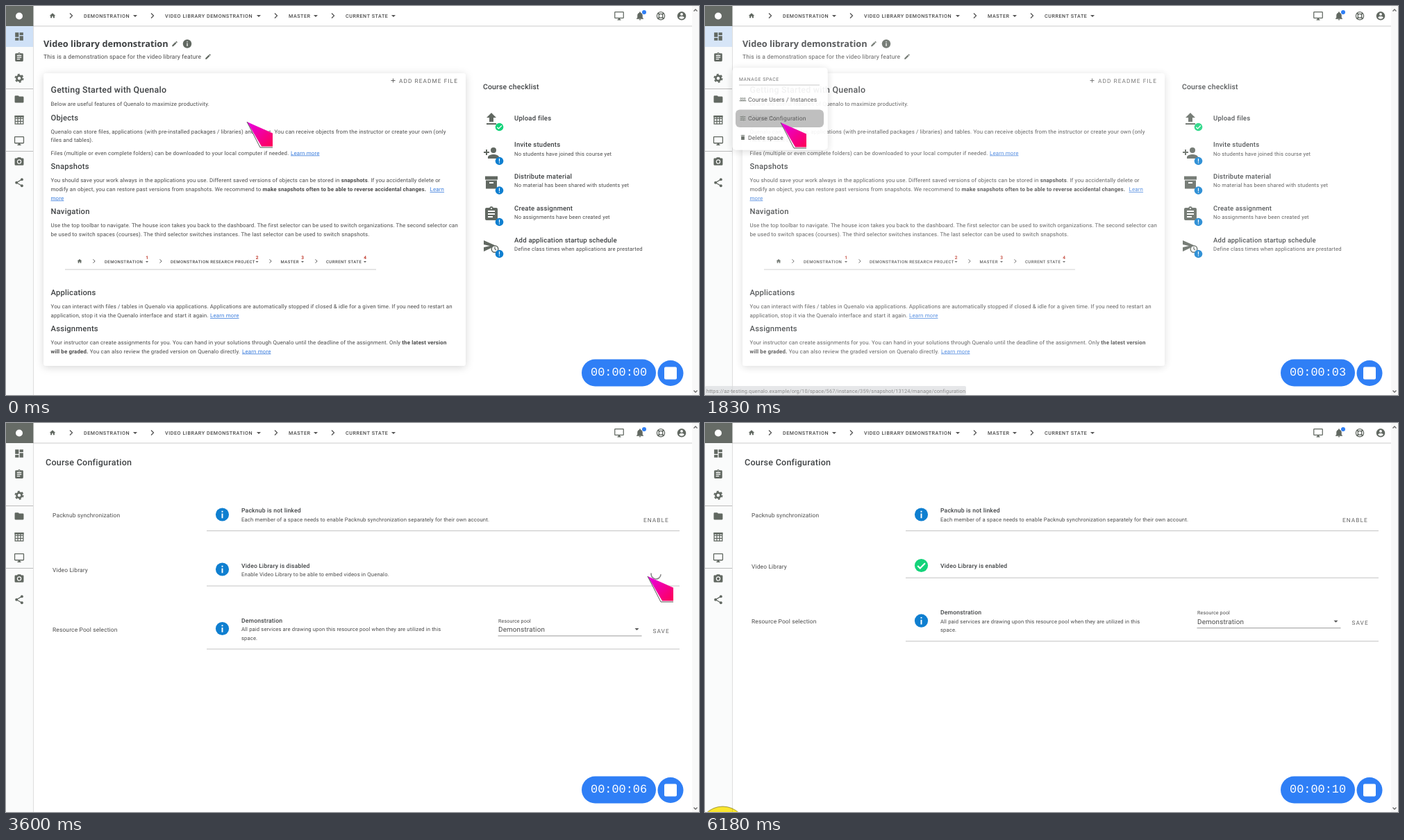
These frames come from a looping animation (998x561 px, 6240 ms). An HTML page:

```html
<!DOCTYPE html>
<html lang="en">
<head>
<meta charset="utf-8">
<title>Course configuration walkthrough</title>
<style>
html, body { margin: 0; width: 100%; height: 100%; overflow: hidden; background: #fff; }
svg { display: block; width: 998px; height: 561px; }
text { font-family: Roboto, sans-serif; letter-spacing: .02em; fill: #4a4a4a; text-rendering: geometricPrecision; }
.m { font-weight: 500; fill: #3e4143; }
.b { font-weight: 700; }
.t { font-family: "Open Sans", sans-serif; font-weight: 700; letter-spacing: 0; fill: #3e4143; }
.nav { font-weight: 500; letter-spacing: .075em; }
.btn { letter-spacing: .127em; fill: #666; }
.cap { letter-spacing: .09em; fill: #666; }
.num { font-weight: 700; fill: #c0392b; }
.a { fill: #3b7ddd; text-decoration: underline; }
.timer { font-family: "Liberation Mono", monospace; letter-spacing: 0; fill: #fff; }
</style>
</head>
<body>
<svg id="stage" viewBox="0 0 998 561"></svg>
<script>
const GREY = '#616861', BLUE = '#0f7fd0', BRIGHT = '#2f7ff6';

// Icons are drawn on a 24-unit grid.
const p = (d, fill = '') => `<path d="${d}"${fill && ` fill="${fill}"`}/>`;
const line = (d, color, width) => `<path d="${d}" fill="none" stroke="${color}" stroke-width="${width}"/>`;
const ring = (r, color, width, extra = '', cx = 12, cy = 12) =>
  `<circle cx="${cx}" cy="${cy}" r="${r}" fill="none" stroke="${color}" stroke-width="${width}" ${extra}/>`;
const dot = (x, y, r, fill) => `<circle cx="${x}" cy="${y}" r="${r}" fill="${fill}"/>`;
const icons = {
  dashboard: p('M3 13h8V3H3zm0 8h8v-6H3zm10 0h8V11h-8zm0-18v6h8V3z'),
  assignment: p('M5 3h4.2a3 3 0 0 1 5.6 0H19a2 2 0 0 1 2 2v14a2 2 0 0 1-2 2H5a2 2 0 0 1-2-2V5a2 2 0 0 1 2-2z') +
    dot(12, 4, 1, '#fff') + p('M7 7h10v2H7zm0 4h10v2H7zm0 4h7v2H7z', '#fff'),
  gear: ring(5.5, GREY, 4) + ring(8.6, GREY, 3, 'stroke-dasharray="4.5 4.5"'),
  folder: p('M10 4H4a2 2 0 0 0-2 2v12a2 2 0 0 0 2 2h16a2 2 0 0 0 2-2V8a2 2 0 0 0-2-2h-8z'),
  table: line('M3 3h18v18H3zM3 9h18M3 15h18M9 4v17M15 4v17', GREY, 2) + p('M2 2h20v4H2z'),
  desktop: line('M3 3h18a1 1 0 0 1 1 1v12a1 1 0 0 1-1 1H3a1 1 0 0 1-1-1V4a1 1 0 0 1 1-1z', GREY, 2) + p('M10 17h4v3h2v2H8v-2h2z'),
  camera: p('M9 2 7.2 4H4a2 2 0 0 0-2 2v12a2 2 0 0 0 2 2h16a2 2 0 0 0 2-2V6a2 2 0 0 0-2-2h-3.2L15 2z') + ring(4.1, '#fff', 1.8),
  share: line('M18 5 6 12l12 7', GREY, 2) + dot(18, 5, 3, GREY) + dot(6, 12, 3, GREY) + dot(18, 19, 3, GREY),
  home: p('M10 20v-6h4v6h5v-8h3L12 3 2 12h3v8z'),
  bell: p('M10 20h4a2 2 0 0 1-4 0zM18 16v-5c0-3-1.6-5.6-4.5-6.3V4a1.5 1.5 0 0 0-3 0v.7C7.6 5.4 6 8 6 11v5l-2 2v1h16v-1z'),
  buoy: ring(9, GREY, 2) + ring(4.5, GREY, 2) + line('M5 5l4 4M19 5l-4 4M5 19l4-4M19 19l-4-4', GREY, 3),
  account: dot(12, 12, 10, GREY) + dot(12, 8.2, 3, '#fff') + p('M6 16c0-4 12-4 12 0-3 4.2-9 4.2-12 0z', '#fff'),
  edit: p('M3 17.2V21h3.8L17.8 9.9l-3.7-3.7zM20.7 7a1 1 0 0 0 0-1.4l-2.3-2.3a1 1 0 0 0-1.4 0l-1.9 1.8 3.8 3.8z'),
  info: dot(12, 12, 10, 'inherit') + p('M11 10.5h2v7h-2zM11 6.5h2v2h-2z', '#fff'),
  check: dot(12, 12, 10, '#14d37a') + line('M6.5 12.5l3.7 3.7 7.500-7.500', '#fff', 2.2),
  alert: dot(12, 12, 10, BLUE) + p('M11 6h2v7.5h-2zM11 15.5h2v2h-2z', '#fff'),
  upload: p('M5 20h14v-2H5zm0-10h4v6h6v-6h4l-7-7z'),
  invite: dot(15, 8, 4, GREY) + p('M6 10V7H4v3H1v2h3v3h2v-3h3v-2zm9 4c-2.7 0-8 1.3-8 4v2h16v-2c0-2.7-5.3-4-8-4z'),
  archive: p('M3 3h18v5H3zM4 9h16v12H4z') + p('M9 11.5h6v2H9z', '#fff'),
  send: p('M1 4l17 7.5-3 1-4.500 3L1 20v-6l9-2-9-2z') + dot(17, 16.5, 5.5, GREY) + dot(17, 16.5, 4, '#fff') +
    line('M17 13.5v3l2 1.5', GREY, 1.3),
  group: [5, 12, 19].map(x => ring(2.2, GREY, 1.8, '', x, 9)).join('') +
    line('M1 18c0-5 8-5 8 0M8 18c0-5 8-5 8 0M15 18c0-5 8-5 8 0M0 18h24', GREY, 1.8),
  tune: line('M2 6h9M15 6h7M13 3v6M2 12h4M10 12h12M8 9v6M2 18h11M17 18h5M15 15v6', GREY, 2.2),
  bin: p('M6 8h12v13H6zM5 4h4l1-1h4l1 1h4v2H5z'),
};

const icon = (name, x, y, size, color = GREY) =>
  `<g transform="translate(${x - size / 2} ${y - size / 2}) scale(${size / 24})" fill="${color}">${icons[name]}</g>`;
const text = (x, y, size, str, cls = '') => `<text x="${x}" y="${y}" font-size="${size}" class="${cls}">${str}</text>`;
const rect = (x, y, w, h, fill, rx = 0, extra = '') =>
  `<rect x="${x}" y="${y}" width="${w}" height="${h}" rx="${rx}" fill="${fill}" ${extra}/>`;
const rule = (x, y, w, color = '#c4c4c4') => rect(x, y, w, 1, color);
const chevron = (x, y, s = 1) => line(`M${x - 2 * s} ${y - 3.5 * s}l${3.5 * s} ${3.5 * s}l${-3.5 * s} ${3.5 * s}`, '#555', 1.3 * s);
const drop = (x, y, s = 3) => `<path d="M${x - s} ${y - s / 2}h${2 * s}l${-s} ${s}z" fill="#555"/>`;
const more = (x, label = 'Learn more') => `<tspan class="a" x="${x}">${label}</tspan>`;
const bold = s => `<tspan class="b">${s}</tspan>`;
const group = (id, body) => `<g id="${id}">${body}</g>`;

const crumbs = [[112, 'DEMONSTRATION', 186, 94], [229, 'VIDEO LIBRARY DEMONSTRATION', 364, 211],
  [407, 'MASTER', 446, 389], [489, 'CURRENT STATE', 558, 471]];
const strip = [[142, 'DEMONSTRATION', 203, 127], [237, 'DEMONSTRATION RESEARCH PROJECT', 361.5, 223],
  [395.5, 'MASTER', 427, 381], [461, 'CURRENT STATE', 517, 447]];

const shell =
  rect(0, 29, 39, 532, '#fafbfb') + rect(39, 29, 1, 532, '#dedede') +
  rect(988, 0, 10, 561, '#f8f8f8') + line('M990.5 7.5l2.5-2.5 2.5 2.5M990.5 554.5l2.5 2.5 2.5-2.5', '#666', 1.3) +
  rule(39, 28.5, 949, '#ccc') + rect(0, 0, 39.5, 29, '#666b66') + dot(19, 14.5, 5, '#fff') +
  group('active', rect(0, 29, 39, 30, '#cfe1f7')) +
  ['dashboard', 'assignment', 'gear', 'folder', 'table', 'desktop', 'camera', 'share']
    .map((n, i) => icon(n, 19, 44 + 30.1 * i, 15.5)).join('') +
  rule(0, 119, 39, '#bbb') + rule(0, 209, 39, '#bbb') +
  icon('home', 67, 14, 10) +
  crumbs.map(([x, s, d, c]) => text(x, 17, 7.2, s, 'nav') + drop(d, 14.5) + chevron(c, 14)).join('') +
  ['desktop', 'bell', 'buoy', 'account'].map((n, i) => icon(n, 883 + 30 * i, 14.3, 15)).join('') + dot(919, 9, 3, BRIGHT);

const prose = [
  [124.5, 12.4, 'Getting Started with Quenalo', 'm'],
  [144, 7.9, 'Below are useful features of Quenalo to maximize productivity.'],
  [165, 11.2, 'Objects', 'm'],
  [183.5, 7.9, 'Quenalo can store files, applications (with pre-installed packages / libraries) and tables. You can receive objects from the instructor or create your own (only'],
  [196, 7.9, 'files and tables).'],
  [214.5, 7.9, 'Files (multiple or even complete folders) can be downloaded to your local computer if needed.' + more(410)],
  [235, 11.2, 'Snapshots', 'm'],
  [254, 7.9, `You should save your work always in the applications you use. Different saved versions of objects can be stored in ${bold('snapshots')}. If you accidentally delete or`],
  [267, 7.9, `modify an object, you can restore past versions from snapshots. We recommend to ${bold('make snapshots often to be able to reverse accidental changes.')}` + more(610.5, 'Learn')],
  [279.5, 7.9, more(64.5, 'more')],
  [300, 11.2, 'Navigation', 'm'],
  [318.5, 7.9, 'Use the top toolbar to navigate. The house icon takes you back to the dashboard. The first selector can be used to switch organizations. The second selector can'],
  [331.5, 7.9, 'be used to switch spaces (courses). The third selector switches instances. The last selector can be used to switch snapshots.'],
  [417, 11.2, 'Applications', 'm'],
  [436, 7.9, 'You can interact with files / tables in Quenalo via applications. Applications are automatically stopped if closed &amp; idle for a given time. If you need to restart an'],
  [449, 7.9, 'application, stop it via the Quenalo interface and start it again.' + more(294)],
  [469, 11.2, 'Assignments', 'm'],
  [488, 7.9, `Your instructor can create assignments for you. You can hand in your solutions through Quenalo until the deadline of the assignment. Only ${bold('the latest version')}`],
  [500.5, 7.9, `${bold('will be graded.')} You can also review the graded version on Quenalo directly.` + more(340)],
];
const tasks = [
  ['upload', 163, 165, 'Upload files', ''],
  ['invite', 212, 203, 'Invite students', 'No students have joined this course yet'],
  ['archive', 254.5, 248.5, 'Distribute material', 'No material has been shared with students yet'],
  ['assignment', 300, 294.5, 'Create assignment', 'No assignments have been created yet'],
  ['send', 346, 340.5, 'Add application startup schedule', 'Define class times when applications are prestarted'],
];

const home = text(54, 59, 12.75, 'Video library demonstration', 't') + icon('edit', 243, 54.5, 10) + icon('info', 261, 54.5, 15) +
  text(54, 76, 8.5, 'This is a demonstration space for the video library feature') + icon('edit', 291, 73, 10) +
  rect(54, 97, 608, 422, '#fff', 4, 'filter="url(#soft)"') +
  line('M554.5 107.5h6M557.5 104.5v6', '#666', 1) + text(566, 111, 8.3, 'ADD README FILE', 'btn') +
  prose.map(([y, size, s, cls]) => text(64.5, y, size, s, cls)).join('') +
  icon('home', 106, 368, 8) + rule(85, 379.5, 448, '#ccc') +
  strip.map(([x, s, d, c], i) => text(x, 370.5, 6, s, 'nav') + drop(d, 369, 2) + chevron(c, 368, .75) +
    text(d - 1.7, 365, 6.5, i + 1, 'num')).join('') +
  text(687, 120, 10.4, 'Course checklist', 'm') +
  tasks.map(([n, iy, y, title, note], i) => icon(n, 699, iy, 24) + icon(i ? 'alert' : 'check', 710.5, iy + 11.5, 14) +
    text(732, y, 9.6, title, 'm') + text(732, y + 12.5, 7.7, note)).join('');

const menu = rect(39.5, 89, 137, 118.5, '#fff', 5, 'filter="url(#soft)"') +
  text(49, 107.5, 6.8, 'MANAGE SPACE', 'cap') + rule(49, 113.5, 116) +
  rect(44, 149.5, 127, 25.5, '#777', 6, 'id="press"') +
  [['group', 'Course Users / Instances'], ['tune', 'Course Configuration'], ['bin', 'Delete space']]
    .map(([n, s], i) => icon(n, 54.5, 134.5 + 27.5 * i, 9.5) + text(62, 137.5 + 27.5 * i, 8.5, s)).join('');

const config = text(57, 61, 12.5, 'Course Configuration', 'm') +
  text(67, 136, 8.4, 'Packnub synchronization') + icon('info', 311.5, 132, 23, BLUE) +
  text(339, 129, 8.6, 'Packnub is not linked', 'm') +
  text(339, 141.5, 7.7, 'Each member of a space needs to enable Packnub synchronization separately for their own account.') +
  text(918, 142.5, 8.3, 'ENABLE', 'btn') + rule(289, 155, 681) +
  group('videoLabel', text(67, 215, 8.4, 'Video Library')) +
  group('off', icon('info', 311.5, 211, 23, BLUE) + text(339, 208.5, 8.6, 'Video Library is disabled', 'm') +
    text(339, 220.5, 7.7, 'Enable Video Library to be able to embed videos in Quenalo.')) +
  group('on', icon('check', 311.5, 205.5, 23) + text(339, 209, 8.6, 'Video Library is enabled', 'm')) +
  rect(910, 203.5, 53, 28, '#777', 4, 'id="ripple"') +
  group('enable', text(918, 221.5, 8.3, 'ENABLE', 'btn')) +
  '<path id="spinner" fill="none" stroke="#858585" stroke-width="1.6"/>' +
  group('videoRule', rule(289, 234.5, 681)) +
  group('pool', text(67, 300.5, 8.4, 'Resource Pool selection') + icon('info', 311.5, 296.5, 23, BLUE) +
    text(339, 287.5, 8.6, 'Demonstration', 'm') +
    text(339, 300, 7.6, 'All paid services are drawing upon this resource pool when they are utilized in this') +
    text(339, 312.5, 7.6, 'space.') + text(709, 287.5, 7.1, 'Resource pool') + text(709, 301, 9.8, 'Demonstration') +
    drop(908.5, 297.5) + rule(708.5, 306.5, 207, '#999') + text(931.5, 302.5, 8.3, 'SAVE', 'btn') + rule(289, 325.5, 681));

const $ = id => document.getElementById(id);
$('stage').innerHTML = `<defs>
  <filter id="soft" x="-20%" y="-20%" width="140%" height="140%"><feDropShadow dx="0" dy="2" stdDeviation="6" flood-opacity=".16"/></filter>
  <linearGradient id="pink" x2="1" y2="1"><stop offset=".1" stop-color="#e800d8"/><stop offset="1" stop-color="#ff0055"/></linearGradient></defs>` +
  shell + group('home', home) + group('config', config) + group('menu', menu) +
  group('status', rect(0, 548, 376, 13, '#d9dbde', 2) +
    text(2, 557.5, 7.4, 'https://az-testing.quenalo.example/org/10/space/567/instance/359/snapshot/13124/manage/configuration')) +
  rect(829, 509.5, 107, 39, BRIGHT, 19.5) + `<text id="timer" class="timer" x="842" y="533" font-size="16.9"></text>` +
  dot(957, 529.5, 18.5, BRIGHT) + rect(948, 520.5, 18, 18, '#fff', 2) +
  '<circle id="flash" r="34" fill="#ffea2e" stroke="#8f8420" stroke-width=".8" style="mix-blend-mode:multiply"/>' +
  group('cursor', `<path d="M0 0L37 16.5V37H19z" fill="#fff"/><path d="M0 0L37 16.5V35.5H21z" fill="url(#pink)"/>
    <path d="M37 37H19L0 0" fill="none" stroke="#444" stroke-width=".9"/>`);

const LOOP = 6240;
const moves = [[30, 630, 24.5, 104], [960, 1500, 109, 168], [2280, 2880, 924, 221],
  [3870, 4470, 785, 212.5], [5640, 6030, 25.5, 587]];
const clicks = [[1620, 1740], [3240, 3360], [6180, LOOP]];

const ramp = (t, a, b) => Math.min(1, Math.max(0, (t - a) / (b - a)));
const ease = k => k < .5 ? 4 * k ** 3 : 1 - 4 * (1 - k) ** 3;
const within = (t, a, b) => t >= a && t < b;
const fade = (id, k) => $(id).setAttribute('opacity', k);
const place = (id, x, y) => $(id).setAttribute('transform', `translate(${x} ${y})`);

function spinnerPath(t) {
  const start = (110 + (t - 4380) * .6) * Math.PI / 180;
  const sweep = (150 + 125 * Math.sin((t - 4380) / 125 + .284)) * Math.PI / 180;
  const at = a => `${936 + 7 * Math.cos(a)} ${218 + 7 * Math.sin(a)}`;
  return `M${at(start)}A7 7 0 ${sweep > Math.PI ? 1 : 0} 1 ${at(start + sweep)}`;
}

function draw(t) {
  let x = 347, y = 167;
  for (const [a, b, tx, ty] of moves) {
    const k = ease(ramp(t, a, b));
    x += (tx - x) * k;
    y += (ty - y) * k;
  }
  place('cursor', x, y);
  place('flash', x, y);
  fade('flash', clicks.some(([a, b]) => within(t, a, b)) ? 1 : 0);

  fade('menu', ramp(t, 510, 610) * (1 - ramp(t, 1815, 1995)));
  fade('press', .04 * ramp(t, 1350, 1440) + .46 * ramp(t, 1620, 1800));
  fade('status', .8 * ramp(t, 1620, 1740) * (1 - ramp(t, 1800, 1950)));
  fade('active', 1 - ramp(t, 1800, 1980));
  fade('home', 1 - ramp(t, 1800, 2010));
  fade('config', ramp(t, 1950, 2100));

  const loading = t >= 3420;
  const done = ease(ramp(t, 4830, 5010));
  fade('ripple', .35 * ramp(t, 3240, 3360) * (1 - ramp(t, 3360, 3540)));
  fade('enable', loading ? 0 : 1);
  fade('spinner', loading ? 1 - ramp(t, 4800, 4860) : 0);
  $('spinner').setAttribute('d', spinnerPath(t));
  fade('off', 1 - done);
  fade('on', done);
  place('videoLabel', 0, -5.5 * done);
  place('videoRule', 0, -11.7 * done);
  place('pool', 0, -11.3 * done);

  const seconds = Math.floor((t - 570) / 588.75) + 1;
  $('timer').textContent = '00:00:' + String(seconds).padStart(2, '0');
}

const begin = performance.now();
function tick() {
  draw(Math.floor((performance.now() - begin) % LOOP / 30) * 30);
  requestAnimationFrame(tick);
}
tick();
</script>
</body>
</html>
```
